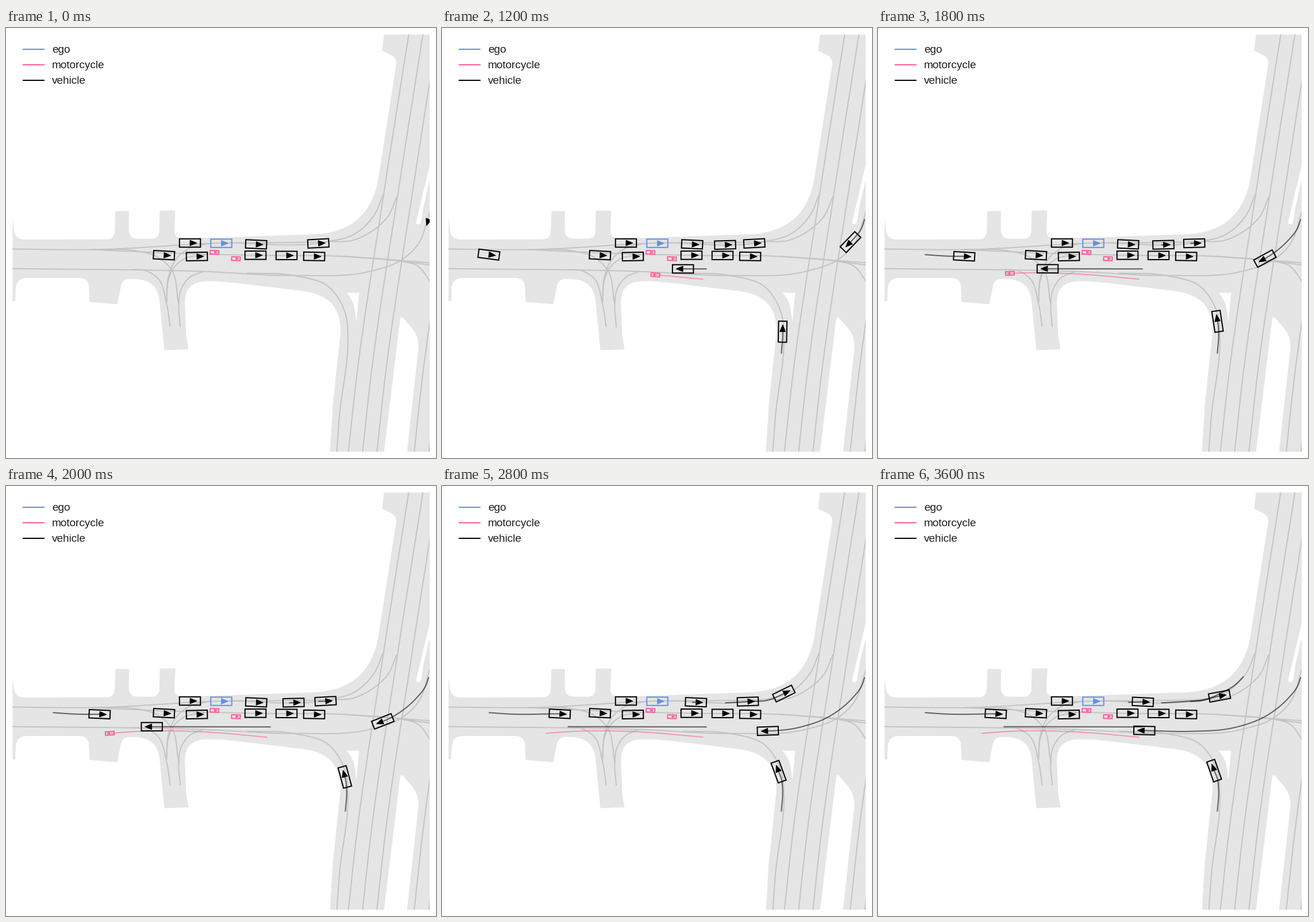
Write a matplotlib script that moves like this. It is 748 px wide and 748 px high and loops after 3.8 s.

```python
import numpy as np
import matplotlib.pyplot as plt
from matplotlib.animation import FuncAnimation
from matplotlib.patches import PathPatch, Polygon
from matplotlib.path import Path

SIZE, DPI = 748, 100
LO, HI = 11, 737
FRAMES, STEP = 19, 200
PX = 72 / DPI
ROAD, LANE = "#e5e5e5", "#c4c4c4"
EGO, MOTO, CAR = "#6490e8", "#f7609b", "#000000"
CAR_SIZE, MOTO_SIZE = (36.5, 14.5), (15, 6.2)

fig = plt.figure(figsize=(SIZE / DPI, SIZE / DPI), dpi=DPI, facecolor="white")
side = (HI - LO) / SIZE
ax = fig.add_axes([LO / SIZE, 1 - HI / SIZE, side, side])
# Coordinates are pixel centres
ax.set_xlim(LO - 0.5, HI - 0.5)
ax.set_ylim(HI - 0.5, LO - 0.5)
ax.axis("off")


def smooth(points, n=14):
    """Cubic Hermite curve through the points, spaced by chord length."""
    p = np.array(points, float)
    if len(p) < 3:
        return p
    t = np.r_[0, np.cumsum(np.hypot(*np.diff(p, axis=0).T))]
    m = np.gradient(p, t, axis=0)
    u = np.linspace(0, 1, n)[:, None]
    parts = []
    for i in range(len(p) - 1):
        h = t[i + 1] - t[i]
        parts.append((2 * u**3 - 3 * u**2 + 1) * p[i] + (u**3 - 2 * u**2 + u) * h * m[i]
                     + (3 * u**2 - 2 * u**3) * p[i + 1] + (u**3 - u**2) * h * m[i + 1])
    return np.vstack(parts)


def area(color, *corners):
    """Filled shape; a third value rounds that corner."""
    pts = np.array([c[:2] for c in corners], float)
    verts, codes = [], []
    for i, corner in enumerate(corners):
        p, radius = pts[i], corner[2] if len(corner) > 2 else 0
        if radius:
            ends = [p + radius * (q - p) / np.hypot(*(q - p))
                    for q in (pts[i - 1], pts[(i + 1) % len(pts)])]
            verts += [ends[0], p, ends[1]]
            codes += [Path.LINETO, Path.CURVE3, Path.CURVE3]
        else:
            verts.append(p)
            codes.append(Path.LINETO)
    codes[0] = Path.MOVETO
    ax.add_patch(PathPatch(Path(verts, codes), fc=color, ec="none", lw=0, zorder=1))


def lane(*points):
    x, y = smooth(points).T
    ax.plot(x, y, color=LANE, lw=2 * PX, zorder=2)


# Western road with its side streets
area(ROAD, (11, 332), (15, 367.5, 17), (188, 367, 14), (190, 318), (213.5, 318), (213, 366, 16),
     (266, 366, 13), (267, 317), (294, 317), (292, 365.5, 14), (360, 364.5), (360, 440),
     (309, 440, 40), (313, 535), (317, 558.5), (275, 560), (263, 437, 38), (202, 436, 12),
     (193, 480), (145, 476), (143, 434.5, 16), (17, 434.5, 19), (15.5, 475), (11, 475))
# Crossing and the north-south road
area(ROAD, (343, 365), (632.5, 355, 98), (680, 52, 12), (654, 39), (657, 11), (738, 11),
     (738, 738), (563, 738), (568, 655), (588, 466, 72), (400, 443), (343, 438))
# Islands
area("white", (738, 232), (712, 341, 5), (721, 341, 5), (726, 308), (738, 258))
area("white", (592, 460), (614, 460), (609, 511), (604, 475, 14))
area("white", (657, 738), (686, 499, 8), (719, 537, 22), (697, 738))

# North-south lanes all share one shape
for dx in (0, 24.7, 49.6, 114.5, 140):
    lane(*[(x + dx, y) for x, y in ((700, 11), (655, 298), (609, 610), (595, 738))])

# West-east lanes and turns
lane((11, 384), (150, 385), (374, 373.5), (560, 371), (604, 359), (640, 325), (655, 291))
lane((374, 373.5), (560, 371), (602, 369), (636, 353), (664, 327), (679, 294))
lane((150, 385), (260, 390), (434, 395), (590, 397), (686, 405), (738, 412))
lane((590, 397), (686, 404), (738, 408))
lane((640, 400), (686, 405), (715, 413), (738, 441))
lane((738, 316), (714, 379), (686, 404), (636, 422), (500, 430), (343, 423), (11, 418))
lane((420, 426), (500, 430), (560, 449), (592, 505), (594, 530), (579, 680), (575, 738))

# Side street
lane((220, 420), (240, 421), (262, 433), (279, 480), (285, 519))
lane((302.5, 519), (300, 480), (303, 457), (318, 434), (343, 423))
lane((150, 385), (225, 387), (262, 397), (286, 418), (300, 480))
lane((279, 475), (281, 442), (291, 417), (310, 401), (345, 394))
lane((279, 470), (282, 433), (295, 402), (318, 383), (355, 374))

# Legend
for row, (color, name) in enumerate(((EGO, "ego"), (MOTO, "motorcycle"), (CAR, "vehicle"))):
    y = 36.3 + 27.2 * row
    ax.plot([28, 66], [y, y], color=color, lw=2 * PX, solid_capstyle="butt", zorder=6)
    ax.text(79.4, y + 6.2, name, color="#1c1c1c", family="Liberation Sans",
            size=19 * PX, va="baseline", zorder=6)


def power(p):
    return lambda u: u**p


def settle(p):
    return lambda u: 1 - (1 - u)**p


def paced(*keys):
    """Piecewise steady speed through (time share, distance share) pairs."""
    t, s = zip((0, 0), *keys, (1, 1))
    return lambda u: np.interp(u, t, s)


class Agent:
    """Outlined box that follows a path from a start step for a span of steps."""

    def __init__(self, *path, start=0, span=1, ease=power(1), born=None, gone=FRAMES,
                 tilt=0, color=CAR, size=CAR_SIZE):
        self.path = smooth(path)
        self.dist = np.r_[0, np.cumsum(np.hypot(*np.diff(self.path, axis=0).T))]
        self.start, self.span, self.ease = start, span, ease
        self.born, self.gone = start if born is None else born, gone
        self.tilt, self.size = np.radians(tilt), size
        self.trail, = ax.plot([], [], color=color, alpha=0.58, lw=2 * PX,
                              solid_capstyle="butt", zorder=3)
        self.box = Polygon([(0, 0)] * 4, fill=False, ec=color, lw=2 * PX, zorder=5, snap=False)
        self.arrow = Polygon([(0, 0)] * 3, fc=color, ec=color, lw=0.8 * PX, zorder=5)
        ax.add_patch(self.box)
        ax.add_patch(self.arrow)

    def at(self, s):
        return np.array([np.interp(s, self.dist, c) for c in self.path.T])

    def draw(self, step):
        s = self.dist[-1] * self.ease(np.clip((step - self.start) / self.span, 0, 1))
        pos = self.at(s)
        shown = step >= self.born and s > 1
        track = np.vstack([self.path[self.dist < s], pos])
        self.trail.set_data(*(track.T if shown else ([], [])))

        alive = self.born <= step < self.gone
        dx, dy = self.at(s + 1) - self.at(s - 1)
        angle = np.arctan2(dy, dx) + self.tilt
        c, sn = np.cos(angle), np.sin(angle)
        l, w = self.size

        def place(shape):
            return np.array(shape) * (l, w) @ [[c, sn], [-sn, c]] + pos

        corners = place([(-0.5, -0.5), (0.5, -0.5), (0.5, 0.5), (-0.5, 0.5)])
        self.box.set_xy(corners)
        self.arrow.set_xy(place([(0, -0.34), (0.33, 0), (0, 0.34)]))
        # A box that crosses the right border is not drawn
        self.box.set_visible(alive and corners[:, 0].max() < HI)
        self.arrow.set_visible(alive)


def parked(x, y, tilt=0, **style):
    return Agent((x, y), (x, y), tilt=tilt, **style)


bike = dict(color=MOTO, size=MOTO_SIZE)
queue = [(319.5, 373.5), (274.3, 394.7, 3), (331.5, 397, -1), (433.5, 394.8), (487.5, 395.2),
         (535.6, 396.8, 1)]
agents = [parked(*spot) for spot in queue]
agents += [
    parked(362.2, 389.8, 2, **bike),
    parked(399.5, 400.8, 2, **bike),
    parked(374, 374, color=EGO),
    # pulling away eastward, two of them into the northern turn
    Agent((434.6, 375.8), (460.2, 375), start=9, span=9, ease=power(2.3), born=0, tilt=4.5),
    Agent((542.8, 374.2), (562.5, 373), (595.3, 360), (620, 346), (635.5, 331),
          start=6, span=11, ease=power(2.1), born=0, gone=18),
    Agent((492, 376.8), (532, 374.4), (560, 372.3), (593.6, 365),
          start=6, span=12, ease=power(2.35), tilt=2),
    # arriving from the west
    Agent((81, 393.7), (116, 396.1), (204.3, 395.8), start=6, span=8, ease=power(0.6), tilt=3.5),
    # crossing westward
    Agent((460, 418.6), (218, 418.2), start=5, span=5.85, gone=12),
    Agent((454.2, 436.4), (340, 427), (236, 426), (180, 429.7),
          start=4, span=6, ease=power(1.08), gone=11, **bike),
    # arriving from the south
    Agent((589.8, 566), (592, 528), (589.4, 507), (584.2, 494.6),
          start=2, span=16, ease=settle(2.6), tilt=4),
    # arriving from the north-east
    Agent((734.8, 332), (729.6, 347), (711, 371), (673.2, 400.3), (618.2, 420), (542, 426.3),
          (462.8, 424.8), span=18, ease=paced((4 / 18, 0.052), (0.5, 0.308), (2 / 3, 0.497))),
]


def update(step):
    for agent in agents:
        agent.draw(step)
    return []


anim = FuncAnimation(fig, update, frames=FRAMES, interval=STEP, repeat=True,
                     repeat_delay=0, blit=False)
plt.show()
```
